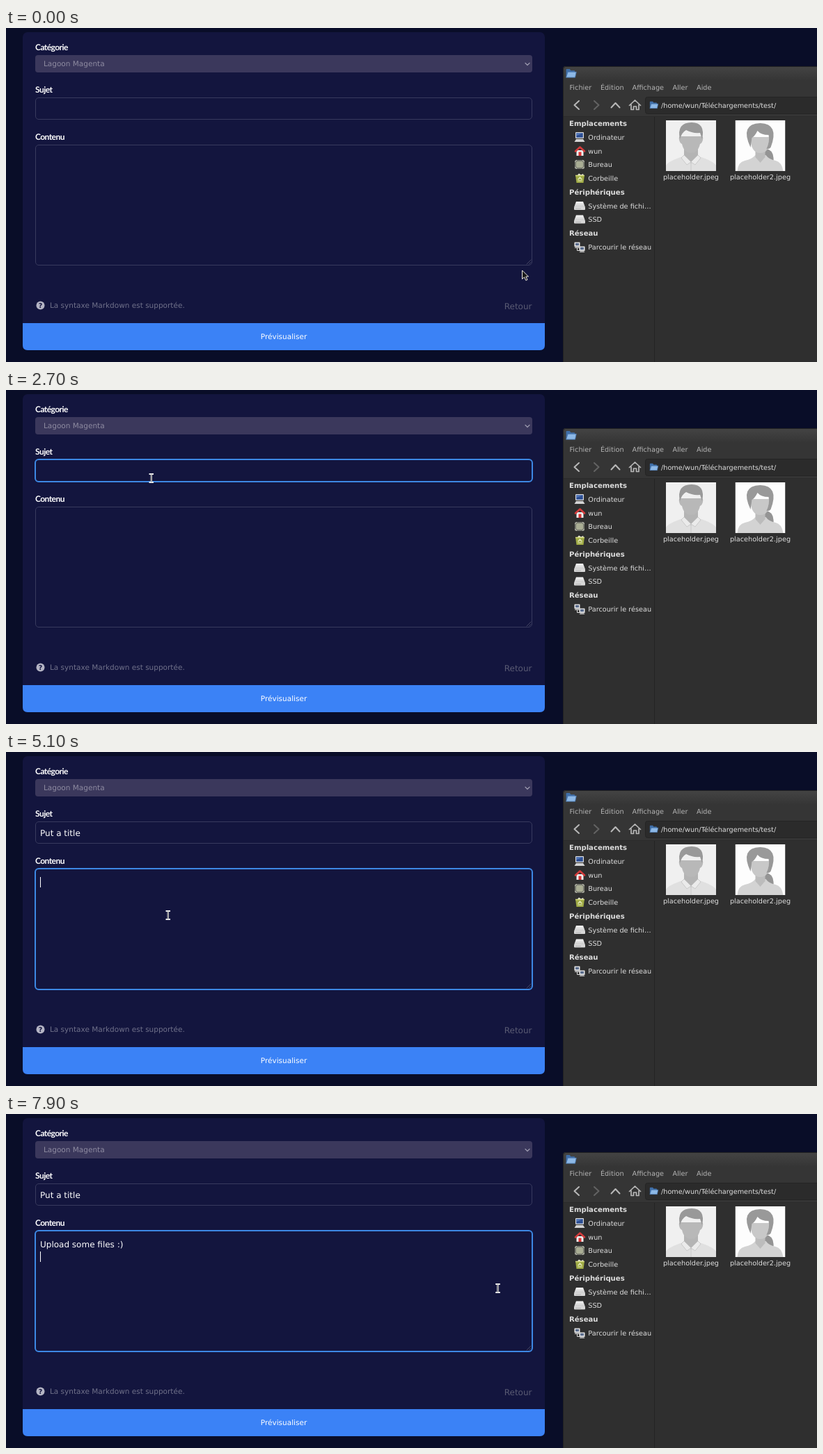
These frames come from a looping animation (1165 by 481 pixels, 8 s). An HTML page:

```html
<!DOCTYPE html>
<html lang="fr">
<head>
<meta charset="utf-8">
<title>Nouveau sujet</title>
<style>
html, body { margin: 0; width: 100%; height: 100%; overflow: hidden; background: #090d28; }
svg { display: block; width: 1165px; height: 481px; }
text { font-family: "DejaVu Sans", sans-serif; text-rendering: geometricPrecision; white-space: pre; }
.label { font: 700 12px Lato, sans-serif; letter-spacing: -.55px; fill: #fff; }
.small { font-size: 10.5px; }
.input { font-size: 12px; fill: #fff; }
.field { fill: #13153e; }
.files text { font-size: 9.7px; fill: #dedede; }
.files .menu { fill: #b4b4b4; }
.files .head { font-size: 10.1px; font-weight: 700; }
.line { fill: none; stroke-linecap: round; stroke-linejoin: round; }
</style>
</head>
<body>
<svg viewBox="0 0 1165 481" xmlns="http://www.w3.org/2000/svg">
  <defs>
    <linearGradient id="bar" x2="0" y2="1">
      <stop stop-color="#444"/><stop offset="1" stop-color="#353535"/>
    </linearGradient>
    <linearGradient id="metal" x2="0" y2="1">
      <stop stop-color="#f4f4f4"/><stop offset="1" stop-color="#c9c9c9"/>
    </linearGradient>
    <clipPath id="thumb"><rect width="72" height="73"/></clipPath>
    <g id="folder">
      <path d="M1 2q0-1 1-1h4l1.5 2H12q1 0 1 1v7H1z" fill="#3f6ea8"/>
      <path d="M3.5 5H15l-1.6 7.500H1z" fill="#8db8e6" stroke="#4877b0" stroke-width=".8"/>
    </g>
    <g id="drive">
      <path d="M3 1h10l3 8H0z" fill="url(#metal)"/>
      <rect y="8.500" width="16" height="4.500" rx="1" fill="#d8d8d8"/>
      <path d="M2 11h8" stroke="#aaa" stroke-width=".8"/>
    </g>
    <g id="screen">
      <rect width="8" height="6.500" rx=".6" fill="#e8e8e8"/>
      <rect x="1.500" y="1.300" width="5" height="3.500" fill="#5a6c8c"/>
      <path d="M1.500 7h5l1.500 1.500H0z" fill="#d4d4d4"/>
    </g>
  </defs>

  <rect x="24" y="6" width="750" height="458" rx="7" fill="#13153e"/>
  <text class="label" x="42" y="32">Catégorie</text>
  <rect x="42" y="39" width="714" height="25" rx="4" fill="#3b385c"/>
  <text class="small" x="54" y="55.300" fill="#8e8ba1">Lagoon Magenta</text>
  <path class="line" d="M746 50.500l3 3 3-3" stroke="#9d9bb0" stroke-width="1.200"/>

  <text class="label" x="42" y="93">Sujet</text>
  <rect class="field" id="subjectBox"/>
  <text class="input" id="subject" x="49" y="120.500"></text>

  <text class="label" x="42" y="161">Contenu</text>
  <rect class="field" id="contentBox"/>
  <path class="line" d="M748 340l6-6M751.500 340l2.500-2.500" stroke="#55566f" stroke-width=".8"/>
  <text class="input" id="content" x="49" y="191.500"></text>
  <rect id="caret" width="1" height="15" fill="#fff"/>

  <circle cx="49.500" cy="399.500" r="6" fill="#b4b4c4"/>
  <text x="49.600" y="403" text-anchor="middle" font-size="9.500" font-weight="700" fill="#13153e">?</text>
  <text class="small" x="63" y="402.800" fill="#70718a">La syntaxe Markdown est supportée.</text>
  <text x="755.500" y="405" text-anchor="end" font-size="12" fill="#5a5b73">Retour</text>
  <path d="M24 425H774V457q0 7-7 7H31q-7 0-7-7z" fill="#3b82f6"/>
  <text class="small" x="399" y="447.800" text-anchor="middle" fill="#fff">Prévisualiser</text>

  <g class="files" id="files">
    <path d="M800 481V59q0-4 4-4H1165V481z" fill="#353535"/>
    <path d="M801 76V59q0-4 4-4H1165V76z" fill="url(#bar)"/>
    <rect x="801" y="128" width="364" height="353" fill="#2f2f2f"/>
    <path d="M800.500 481V59q0-3.500 3.500-3.500H1165" fill="none" stroke="#222"/>
    <path d="M801 127.500H1165" stroke="#2a2a2a"/>
    <path d="M931.500 128V481" stroke="#232323"/>
    <use href="#folder" transform="translate(803.500 58) scale(1.050)"/>
    <g class="line" stroke="#b8b8b8" stroke-width="2">
      <path d="M823 105l-6.500 6 6.500 6"/>
      <path d="M845 105l6.500 6-6.500 6" stroke="#636363"/>
      <path d="M869.500 114.500l6-6.500 6 6.500"/>
      <path d="M895.500 111.500l8-7.500 8 7.500M898 110.500v7h3.500v-4.500h4v4.500h3.500v-7" stroke-width="1.700"/>
    </g>
    <rect x="918.500" y="99.500" width="260" height="24" rx="3" fill="#2b2b2b" stroke="#242424"/>
    <use href="#folder" transform="translate(924 105) scale(.85)"/>
    <text x="941" y="114.500">/home/wun/Téléchargements/test/</text>

    <g transform="translate(816 150)">
      <rect x="2" width="12" height="9" rx="1" fill="#dedede"/>
      <rect x="3.200" y="1.200" width="9.600" height="6.600" fill="#2d4f94"/>
      <path d="M3.200 1.200h9.600l-9.600 4z" fill="#5478b9"/>
      <path d="M3 10h10l2.500 4H.5z" fill="#d3d3d3"/>
    </g>
    <g transform="translate(817 170)">
      <path d="M2.500 6h10v8h-10z" fill="#eee"/>
      <path d="M5.500 8.500h4V14h-4z" fill="#d33"/>
      <path class="line" d="M1 7.500l6.500-6 6.500 6" stroke="#d43b3b" stroke-width="2.600"/>
    </g>
    <g transform="translate(817 190)">
      <rect width="14" height="13" rx="1.500" fill="#77796f"/>
      <rect x="2" y="2" width="10" height="9" rx="2" fill="#a9ad94"/>
      <path d="M0 3l3-3M11 13l3-3M0 10l3 3M11 0l3 3" stroke="#c4c4ba"/>
    </g>
    <g transform="translate(817 209)">
      <path d="M1 3h13l-1.500 11h-10z" fill="#a0ab45"/>
      <path d="M3 4l3-3.500 3 2L12 1l1 3z" fill="#ececdc"/>
      <path d="M1 3.500h13" stroke="#d0d67c" stroke-width="1.500"/>
      <path d="M5 9l2.500-3L10 9M5 11h5" class="line" stroke="#e6e9c0" stroke-width="1.200"/>
    </g>
    <use href="#drive" x="816" y="249"/>
    <use href="#drive" x="816" y="268.500"/>
    <path d="M820.500 316v4.500h4" fill="none" stroke="#ddd"/>
    <use href="#screen" x="816.500" y="308.500"/>
    <use href="#screen" x="823.500" y="314.500"/>

    <g transform="translate(948 133)" clip-path="url(#thumb)">
      <rect width="72" height="73" fill="#f0f0f0"/>
      <path d="M0 73V65q3-6 24-13h24q21 7 24 13v8z" fill="#e0e0e0"/>
      <path d="M26 38h20v15l-10 9-10-9z" fill="#b4b4b4"/>
      <path d="M26 50l-4 4 8 10 6-4 6 4 8-10-4-4-10 10z" fill="#ebebeb" stroke="#cacaca"/>
      <path d="M36 61v12" stroke="#cacaca"/>
      <path d="M21 23q-3 0-2 5t4 6q3 13 13 13t13-13q3-1 4-6t-2-5z" fill="#b8b8b8"/>
      <path d="M20 27Q15 3 37 3q20 0 15 24l-3-9q-11 1-20-4-6 3-9 13z" fill="#999"/>
    </g>
    <g transform="translate(1047.500 133)" clip-path="url(#thumb)">
      <rect width="72" height="73" fill="#fdfdfd"/>
      <path d="M44 41q10 1 11 13 1 6-4 9-8-5-9-15z" fill="#949494"/>
      <path d="M3 73q1-13 11-15 10-2 15-8h15q4 6 14 8 9 2 11 15z" fill="#d3d3d3"/>
      <path d="M29 41h14v12l-7 8-7-8z" fill="#bcbcbc"/>
      <path d="M22 24q0 23 14 23t14-23z" fill="#c8c8c8"/>
      <path d="M22 39Q6 5 36 4q28 1 15 35-3 3-6 2 5-11 3-20-11 0-16-6-4 8-8 10z" fill="#999"/>
    </g>
    <text x="984" y="218" text-anchor="middle">placeholder.jpeg</text>
    <text x="1083.500" y="218" text-anchor="middle">placeholder2.jpeg</text>
  </g>

  <path id="arrow" d="M0 0V12.500L3 9.800 5.300 14.500 7.500 13.500 5.300 9H9z" fill="#191919" stroke="#eeeae0" stroke-linejoin="round"/>
  <g id="beam" class="line">
    <path id="stem" d="M-2.300-6H-1L0-5 1-6H2.300M0-5V5M-2.300 6H-1L0 5 1 6H2.300" stroke="#eee" stroke-width="2"/>
    <use href="#stem" style="stroke: #222"/>
    <path d="M0-5V5" stroke="#222" stroke-width=".7"/>
  </g>
</svg>
<script>
const LOOP = 8000;
const $ = id => document.getElementById(id);
const set = (el, attrs) => { for (const k in attrs) el.setAttribute(k, attrs[k]); };

function label(x, y, str, cls = "") {
  const el = document.createElementNS("http://www.w3.org/2000/svg", "text");
  set(el, { x, y, class: cls });
  el.textContent = str;
  $("files").append(el);
}
[[809.5, "Fichier"], [854, "Édition"], [899.5, "Affichage"], [957.5, "Aller"], [992, "Aide"]]
  .forEach(([x, s]) => label(x, 89, s, "menu"));
["Emplacements", " Ordinateur", " wun", " Bureau", " Corbeille", "Périphériques",
  " Système de fichi…", " SSD", "Réseau", " Parcourir le réseau"].forEach((s, i) => {
  const item = s[0] === " ";
  label(item ? 836.3 : 809, 141 + i * 19.76, s.trim(), item ? "" : "head");
});

const TITLE = "Put a title";
const BODY = "Upload some files :)";

// [time, letters shown]
const titleKeys = [[0, 0], [3000, 2], [3200, 4], [3300, 5], [3400, 7], [3500, 8], [3700, 10], [3800, 11]];
const bodyKeys = [[0, 0], [5200, 1], [5300, 2], [5500, 3], [5600, 4], [5700, 5], [5800, 6], [5900, 7],
  [6000, 9], [6100, 10], [6200, 11], [6300, 13], [6400, 14], [6500, 15], [6600, 17], [6700, 18], [6800, 20]];
// [time, focused field]
const focusKeys = [[0, ""], [800, "content"], [1500, "subject"], [4400, "content"]];
const hoverKeys = [[0, ""], [600, "content"], [800, ""], [1100, "subject"], [1500, ""]];
const caretKeys = [[0, 0], [800, 1], [2700, 0], [3000, 1], [4200, 0], [4500, 1], [6900, 0], [7300, 1]];
// [time, shape, x, y]
const mouseKeys = [[0, "arrow", 741.5, 349], [600, "beam", 690, 305], [800, "beam", 610, 270],
  [1000, "beam", 450, 215], [1100, "arrow", 270, 146], [1200, "beam", 208.8, 127],
  [4200, "arrow", 222, 148], [4300, "arrow", 240.5, 180.5], [4400, "beam", 340, 245],
  [4500, "beam", 398, 277], [5000, "beam", 290, 250], [5100, "beam", 232.8, 235],
  [7800, "beam", 420, 241], [7900, "beam", 706.5, 251]];

const at = (keys, t) => keys.findLast(k => k[0] <= t);

function drawBox(id, y, h, focus, hover) {
  const on = focus === id;
  const out = on ? .5 : 0;
  set($(id + "Box"), {
    x: 42.5 - out, y: y - out, width: 713 + 2 * out, height: h + 2 * out, rx: 4.5 + out,
    stroke: on ? "#3d88e4" : hover === id ? "#40244f" : "#383a5e",
    "stroke-width": on ? 2 : 1
  });
}

function draw(t) {
  const focus = at(focusKeys, t)[1];
  const hover = at(hoverKeys, t)[1];
  drawBox("subject", 100.5, 31, focus, hover);
  drawBox("content", 168.5, 173, focus, hover);

  $("subject").textContent = TITLE.slice(0, at(titleKeys, t)[1]);
  $("content").textContent = BODY.slice(0, at(bodyKeys, t)[1]);

  const newLine = t >= 6900;
  const typed = focus && !newLine ? $(focus).getComputedTextLength() : 0;
  set($("caret"), {
    x: Math.round(49 + typed),
    y: focus === "subject" ? 109 : newLine ? 198 : 180,
    opacity: at(caretKeys, t)[1]
  });

  const [, shape, x, y] = at(mouseKeys, t);
  for (const id of ["arrow", "beam"])
    set($(id), { transform: `translate(${x} ${y})`, opacity: +(id === shape) });
}

const start = performance.now();
function tick() {
  draw((performance.now() - start) % LOOP);
  requestAnimationFrame(tick);
}
tick();
</script>
</body>
</html>
```
